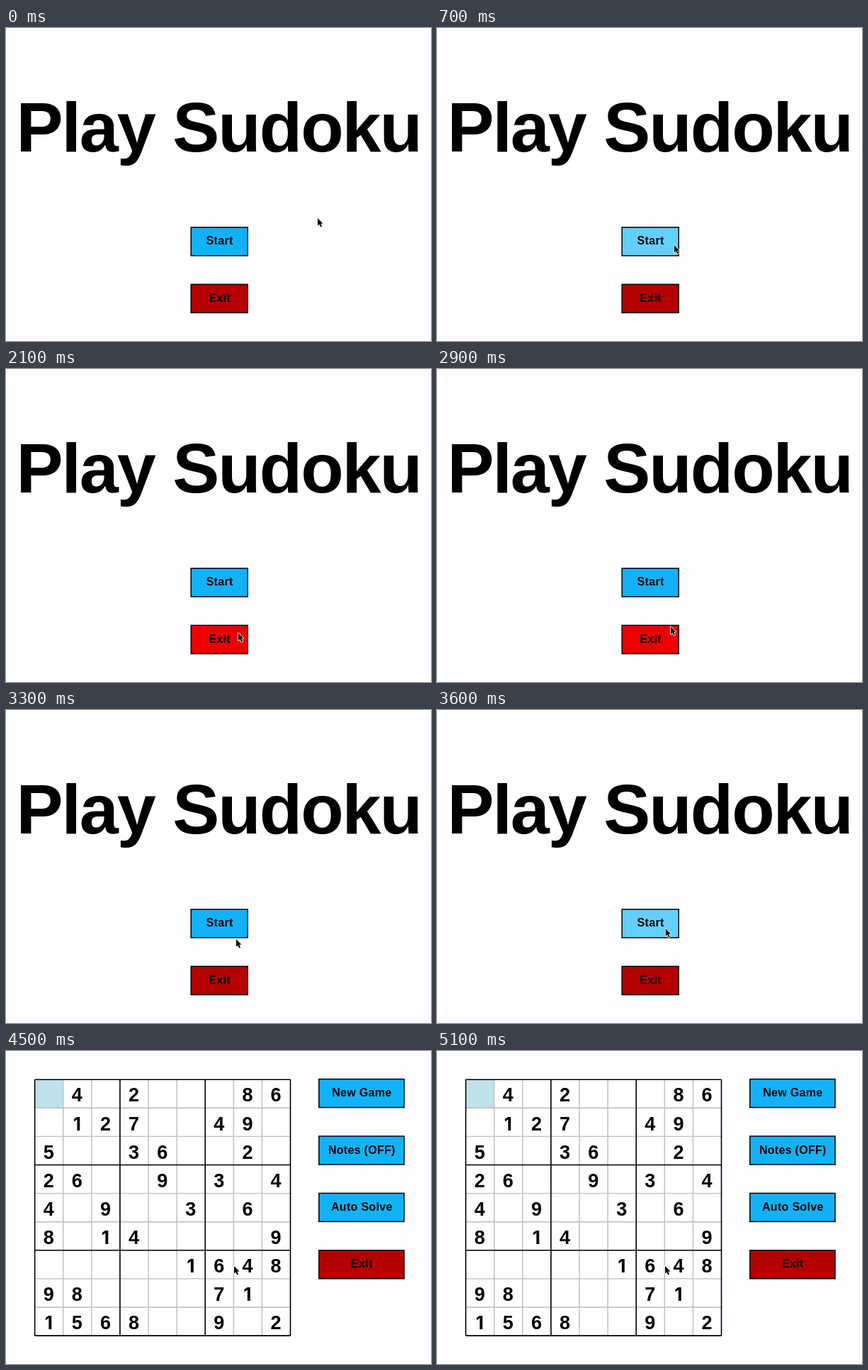
An HTML page with a canvas for the animation above (5400 ms loop, 600 by 441 pixels).

```html
<!DOCTYPE html>
<html lang="en">
<head>
<meta charset="utf-8">
<title>Play Sudoku</title>
<style>
  html, body { margin: 0; width: 100%; height: 100%; overflow: hidden; background: #fefdff; }
  canvas { display: block; }
</style>
</head>
<body>
<canvas id="stage" width="600" height="441"></canvas>
<script>
const ctx = document.getElementById('stage').getContext('2d');
const LOOP = 5400, STEP = 100, GAME_START = 4500;
const CELL = 40.1, LEFT = 40.6, TOP = 40.2;
const SANS = '"Liberation Sans", Arial, sans-serif';
const BLUE = { idle: '#12b2f8', hover: '#62d0fb' };
const RED = { idle: '#b40000', hover: '#ee0000' };

const BOARD = [
  ' 4 2   86', ' 127  49 ', '5  36  2 ',
  '26  9 3 4', '4 9  3 6 ', '8 14    9',
  '     1648', '98    71 ', '1568  9 2'
];

// Pointer waypoints: time, x, y
const PATH = [
  [100, 440, 268], [700, 335, 306], [1000, 333, 307], [1500, 333, 307],
  [1700, 330, 334], [2100, 328, 372], [2500, 331, 377], [2700, 331, 377],
  [2900, 330, 363], [3300, 325, 323], [3700, 322, 303]
];

function pointerAt(t) {
  const next = PATH.findIndex(point => point[0] > t);
  if (next === 0) return PATH[0].slice(1);
  if (next < 0) return PATH[PATH.length - 1].slice(1);
  const [t0, x0, y0] = PATH[next - 1], [t1, x1, y1] = PATH[next];
  const p = (t - t0) / (t1 - t0);
  return [x0 + (x1 - x0) * p, y0 + (y1 - y0) * p];
}

function text(label, x, y, size, spacing = 0, align = 'center', family = SANS) {
  ctx.font = `bold ${size}px ${family}`;
  ctx.letterSpacing = spacing + 'px';
  ctx.textAlign = align;
  ctx.fillStyle = '#000';
  ctx.fillText(label, x, y);
}

function button(label, x, y, width, color, [px, py]) {
  const over = px > x && px < x + width && py > y && py < y + 40;
  ctx.fillStyle = over ? color.hover : color.idle;
  ctx.fillRect(x, y, width, 40);
  ctx.strokeStyle = '#000';
  ctx.lineWidth = 1.5;
  ctx.strokeRect(x, y, width, 40);
  text(label, x + width / 2 + 0.4, y + 24.5, 16, 0.3);
}

function gridLine(i, color, width) {
  const x = LEFT + i * CELL, y = TOP + i * CELL, size = 9 * CELL;
  ctx.strokeStyle = color;
  ctx.lineWidth = width;
  ctx.beginPath();
  ctx.moveTo(x, TOP);
  ctx.lineTo(x, TOP + size);
  ctx.moveTo(LEFT, y);
  ctx.lineTo(LEFT + size, y);
  ctx.stroke();
}

function drawMenu(pointer) {
  text('Play Sudoku', 14.4, 174, 99, -2.05, 'left');
  button('Start', 261.2, 280.8, 80, BLUE, pointer);
  button('Exit', 261.2, 361.2, 80, RED, pointer);
}

function drawGame(pointer) {
  ctx.fillStyle = '#bfe2ea';
  ctx.fillRect(LEFT, TOP, CELL, CELL);
  for (let i = 1; i < 9; i++) if (i % 3) gridLine(i, '#bebebe', 1.4);
  for (let i = 0; i <= 9; i += 3) gridLine(i, '#000', 1.6);
  BOARD.forEach((row, r) => [...row].forEach((digit, c) => {
    const x = LEFT + (c + 0.5) * CELL - 0.4, y = TOP + r * CELL + 31.2;
    // A "1" without a foot
    if (digit === '1') text(digit, x, y, 26, 0, 'center', 'Inter, sans-serif');
    else text(digit, x, y, 27);
  }));
  ['New Game', 'Notes (OFF)', 'Auto Solve', 'Exit'].forEach((label, i) =>
    button(label, 441.8, 39.6 + i * 80.4, 120.2, i < 3 ? BLUE : RED, pointer));
}

const arrow = new Path2D('M0 0V10.6L2.4 8.5 4.2 12.4 6 11.6 4.3 7.8 7.4 7.5Z');

function drawPointer([x, y]) {
  ctx.save();
  ctx.translate(x, y);
  ctx.lineJoin = 'round';
  ctx.lineWidth = 1.6;
  ctx.strokeStyle = '#fff';
  ctx.stroke(arrow);
  ctx.fillStyle = '#000';
  ctx.fill(arrow);
  ctx.restore();
}

function render(now) {
  const t = Math.floor(now % LOOP / STEP) * STEP;
  const pointer = pointerAt(t);
  ctx.fillStyle = '#fefdff';
  ctx.fillRect(0, 0, 600, 441);
  (t < GAME_START ? drawMenu : drawGame)(pointer);
  drawPointer(pointer);
}

ctx.fontKerning = 'none';
const start = performance.now();
function tick() {
  render(performance.now() - start);
  requestAnimationFrame(tick);
}
tick();
</script>
</body>
</html>
```
